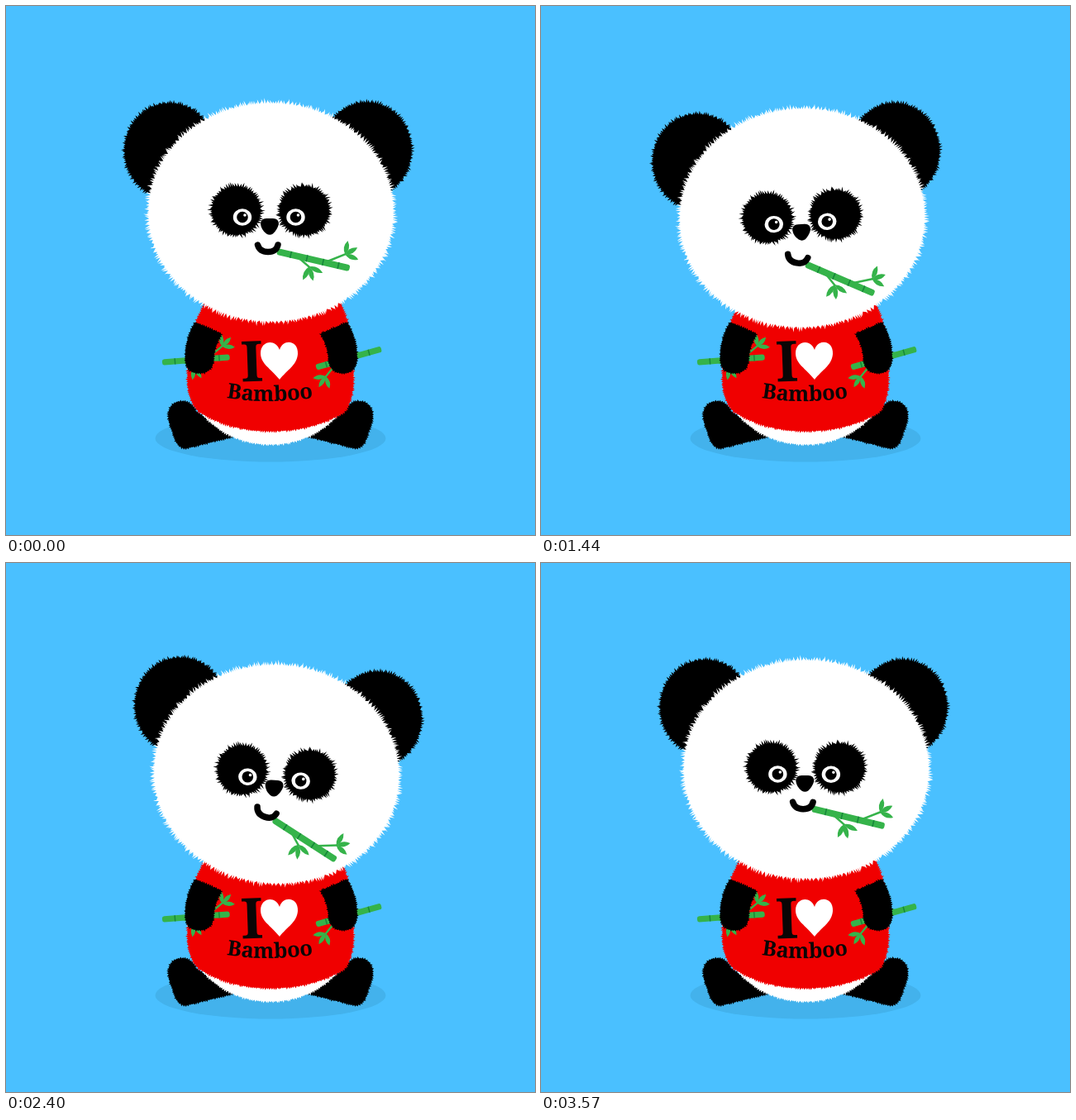
Write an HTML page that moves like this. It is 640 px wide and 640 px high and loops after 3.6 s.

```html
<!DOCTYPE html>
<html lang="en">
<head>
<meta charset="utf-8">
<title>Panda</title>
<style>
html, body { margin: 0; width: 100%; height: 100%; overflow: hidden; background: #4ac0ff; }
svg { display: block; width: 100vw; height: 100vh; }
text { font-family: "Noto Serif", serif; font-weight: bold; fill: #0a0606; }
</style>
</head>
<body>
<svg viewBox="0 0 640 640">
  <defs>
    <g id="stick">
      <path d="M28 2L43 10M62 -2L82 -16" stroke="#35b34a" stroke-width="2.5"/>
      <rect y="-4" width="90" height="8" rx="3" fill="#35b34a"/>
      <path d="M17 -4V4M37 -4V4M57 -4V4M76 -4V4" stroke="#16873a" stroke-width="1.6"/>
      <g id="leaves" fill="#35b34a"></g>
    </g>
    <path id="curve" d="M267 474Q320 483 385 472"/>
  </defs>
  <ellipse cx="320" cy="523" rx="139.500" ry="28.5" fill="#43b2ec"/>
  <g id="body"></g>
  <g>
    <text x="297.500" y="454" font-size="68" text-anchor="middle" transform="rotate(-2 297 430)">I</text>
    <path d="M331 452C320 438 308 433 308 420C308 405 326 402 331 416C335 402 354 404 353 421C352 435 340 440 331 452Z" fill="#fff"/>
    <text font-size="25.500"><textPath href="#curve">Bamboo</textPath></text>
    <use href="#stick" transform="translate(189 431) rotate(-4.3) scale(.91)"/>
    <use href="#stick" transform="translate(454 415) rotate(164.3) scale(.91)"/>
  </g>
  <g id="arms"></g>
  <g id="head">
    <g id="fur"></g>
    <g id="eyes">
      <g id="eye">
        <ellipse cx="286" cy="255.500" rx="11.2" ry="10.2" fill="#fff"/>
        <circle cx="286" cy="255.500" r="6.800"/>
        <circle cx="289" cy="253" r="1.8" fill="#fff"/>
      </g>
      <use href="#eye" x="64.5"/>
    </g>
    <path d="M308 264Q308 257 315 257H323Q330 257 330 264Q328 271 323 275.500Q319 278 315 275.500Q309 271 308 264Z"/>
    <g id="chew">
      <use href="#stick" transform="translate(328 297) rotate(13)"/>
      <path d="M304.500 289Q307 297.500 317 297.500Q327 297.500 329 289" fill="none" stroke="#000" stroke-width="7.500" stroke-linecap="round"/>
    </g>
  </g>
</svg>
<script>
const LOOP = 3600, CHEW = 900;
const $ = id => document.getElementById(id);

let seed = 7;
const random = () => (seed = seed * 16807 % 2147483647) / 2147483647;

function addPath(parent, d, fill) {
  const path = document.createElementNS('http://www.w3.org/2000/svg', 'path');
  path.setAttribute('d', d);
  path.setAttribute('fill', fill);
  return parent.appendChild(path);
}

// Covers a clockwise outline with spikes pointing outwards.
function addFur(parent, d, fill, length, transform = '') {
  const path = addPath(parent, d, fill);
  const total = path.getTotalLength();
  const count = Math.round(total / 2.6);
  let spikes = '';
  for (let i = 0; i < count; i++) {
    const at = i / count * total;
    const p = path.getPointAtLength(at);
    const q = path.getPointAtLength(Math.min(at + 1.5, total));
    const size = Math.hypot(q.x - p.x, q.y - p.y) || 1;
    const tx = (q.x - p.x) / size, ty = (q.y - p.y) / size;
    const out = length * (0.35 + 0.65 * random());
    const lean = 1.3 + (random() - 0.5) * length * 0.7;
    spikes += `${i ? 'L' : 'M'}${p.x} ${p.y}L${p.x + tx * lean + ty * out} ${p.y + ty * lean - tx * out}`;
  }
  path.setAttribute('d', spikes + 'Z');
  path.setAttribute('transform', transform);
}

const oval = (x, y, rx, ry) =>
  `M${x - rx} ${y}A${rx} ${ry} 0 0 1 ${x + rx} ${y}A${rx} ${ry} 0 0 1 ${x - rx} ${y}Z`;

function addLeaf(x, y, angle, length) {
  const leaf = addPath($('leaves'), `M0 0Q${length * 0.5} -6 ${length} 0Q${length * 0.5} 6 0 0Z`, '#35b34a');
  leaf.setAttribute('transform', `translate(${x} ${y}) rotate(${angle})`);
}
for (const angle of [-92, -42, 8]) addLeaf(81, -15, angle, 17);
for (const angle of [102, 62, 12]) addLeaf(42, 9, angle, 18);

const FOOT = 'M205 480Q222 474 230 491L274 521L218 535Q206 535 202 516Q190 489 205 480Z';
const ARM = 'M229 383L261 397Q251 412 251 430Q248 444 234 444Q217 444 217 425Q218 400 229 383Z';
const SHIRT = 'M242 358H404L413 382Q420 415 420 450Q420 477 409 491Q372 514 320 514Q270 514 233 490Q220 477 220 450Q220 415 231 380Z';
const mirror = sum => `translate(${sum} 0) scale(-1 1)`;

for (const side of ['', mirror(640)]) addFur($('body'), FOOT, '#000', 2.5, side);
addFur($('body'), oval(320, 446, 99, 84), '#fff', 3);
addFur($('body'), SHIRT, '#f00000', 3);
for (const side of ['', mirror(641.5)]) addFur($('arms'), ARM, '#000', 2.5, side);

addFur($('fur'), oval(198, 175, 54, 57), '#000', 5);
addFur($('fur'), oval(436.5, 174, 53.5, 57), '#000', 5);
addFur($('fur'), oval(320.5, 249.5, 147.5, 131.5), '#fff', 7);
addFur($('fur'), oval(278.5, 247.5, 29, 29), '#000', 6.5);
addFur($('fur'), oval(361, 247.5, 29.5, 29), '#000', 6.5);

const ease = x => (1 - Math.cos(Math.PI * x)) / 2;

function chewAngle(phase) {
  const stops = [0, -10, 15.5, 0];
  const i = Math.floor(phase * 3);
  return stops[i] + (stops[i + 1] - stops[i]) * ease(phase * 3 - i);
}

function draw(now) {
  const t = now % LOOP;
  const phase = t % CHEW / CHEW;
  const dip = ease(phase * 2);
  const tilt = -5 * Math.sin(2 * Math.PI * t / LOOP);
  const open = Math.min(1, Math.max(0, (Math.abs(t - 1800) - 40) / 80));
  $('head').setAttribute('transform', `translate(0 ${7.5 * dip}) rotate(${tilt} 320 338)`);
  $('chew').setAttribute('transform', `translate(0 ${7.5 * dip}) rotate(${chewAngle(phase)} 317 272)`);
  $('eyes').setAttribute('transform', `translate(0 ${256 * (1 - open)}) scale(1 ${open})`);
}

const start = performance.now();
function tick() {
  draw(performance.now() - start);
  requestAnimationFrame(tick);
}
tick();
</script>
</body>
</html>
```
